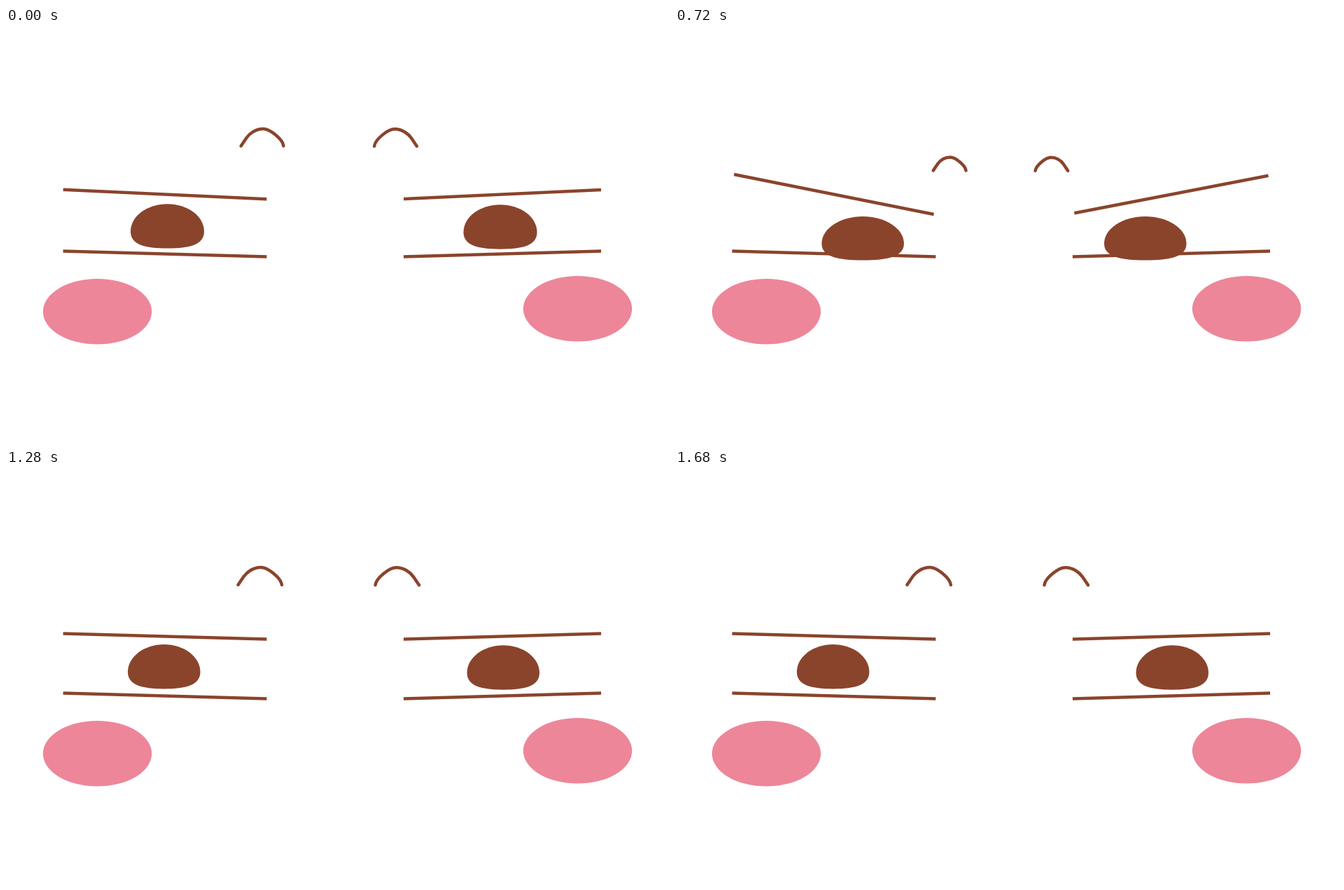
Write an HTML page with a canvas that moves like this. It is 947 px wide and 591 px high and loops after 1880 ms.

```html
<!DOCTYPE html>
<html lang="en">
<head>
<meta charset="utf-8">
<title>Squinting face</title>
<style>
html, body { margin: 0; width: 100%; height: 100%; overflow: hidden; background: #fff; }
canvas { display: block; }
</style>
</head>
<body>
<canvas id="stage" width="947" height="591"></canvas>
<script>
const ctx = document.getElementById('stage').getContext('2d');
const BROWN = '#8a442c';
const PINK = '#ed8699';
const LOOP = 1880;
const STEP = 40;

const clamp = v => Math.min(1, Math.max(0, v));
const mix = (a, b, p) => a + (b - a) * p;
const ramp = (t, start, length) => clamp((t - start) / length);

// 0 = eyes open, 1 = full squint: one slow squint, then a quick one
function squintAt(t) {
  const slow = ramp(t, -40, 360) - ramp(t, 720, 360);
  const quick = ramp(t, 1320 - STEP / 3, 120) - ramp(t, 1560 - STEP / 3, 120);
  return slow + quick;
}

function line(cx, cy, length, degrees) {
  const a = degrees * Math.PI / 180;
  const dx = Math.cos(a) * length / 2, dy = Math.sin(a) * length / 2;
  ctx.lineCap = 'butt';
  ctx.beginPath();
  ctx.moveTo(cx - dx, cy - dy);
  ctx.lineTo(cx + dx, cy + dy);
  ctx.stroke();
}

// Unit path: x runs from the outer end (0) to the inner end (1)
function brow(outer, inner, base, height) {
  const x = u => mix(outer, inner, u);
  const y = v => base - v * height;
  ctx.lineCap = ctx.lineJoin = 'round';
  ctx.beginPath();
  ctx.moveTo(x(0), y(0));
  ctx.lineTo(x(.13), y(.48));
  ctx.bezierCurveTo(x(.2), y(.72), x(.34), y(1), x(.52), y(1));
  ctx.bezierCurveTo(x(.68), y(1), x(.98), y(.4), x(1), y(0));
  ctx.stroke();
}

function eye(left, top, w, h) {
  const x = u => left + u * w;
  const y = v => top + v * h;
  ctx.beginPath();
  ctx.moveTo(x(0), y(.62));
  ctx.bezierCurveTo(x(0), y(.27), x(.23), y(0), x(.5), y(0));
  ctx.bezierCurveTo(x(.77), y(0), x(1), y(.27), x(1), y(.62));
  ctx.bezierCurveTo(x(1), y(.92), x(.8), y(1), x(.5), y(1));
  ctx.bezierCurveTo(x(.2), y(1), x(0), y(.92), x(0), y(.62));
  ctx.fill();
}

function cheek(cx, cy) {
  ctx.beginPath();
  ctx.ellipse(cx, cy, 77.7, 46.8, 0, 0, Math.PI * 2);
  ctx.fill();
}

function draw(p) {
  ctx.fillStyle = '#fff';
  ctx.fillRect(0, 0, 947, 591);

  ctx.fillStyle = PINK;
  cheek(130.5, 404.8);
  cheek(816.5, 400.8);

  ctx.fillStyle = ctx.strokeStyle = BROWN;
  ctx.lineWidth = 4.5;

  const browBase = mix(164, 203.5, p);
  const browHeight = mix(25, 19, p);
  brow(mix(331.5, 368.8, p), mix(394, 415.6, p), browBase, browHeight);
  brow(mix(590, 561.2, p), mix(527.5, 514.6, p), browBase + .3, browHeight);

  line(227, 237.5, 291, mix(1.58, 11.29, p));
  line(709, 237.5, 282.2, mix(-1.62, -10.93, p));
  line(227, 322.5, 291, 1.58);
  line(709, 322.5, 282.2, -1.62);

  const w = mix(103.5, 117.5, p);
  const h = mix(63.5, 62.6, p);
  eye(mix(174, 209.5, p), mix(249, 269, p), w, h);
  eye(mix(658.5, 613, p), mix(250.2, 269, p), w, h);
}

const start = performance.now();
function frame() {
  const t = (performance.now() - start) % LOOP;
  draw(squintAt(Math.floor(t / STEP) * STEP));
  requestAnimationFrame(frame);
}
frame();
</script>
</body>
</html>
```
